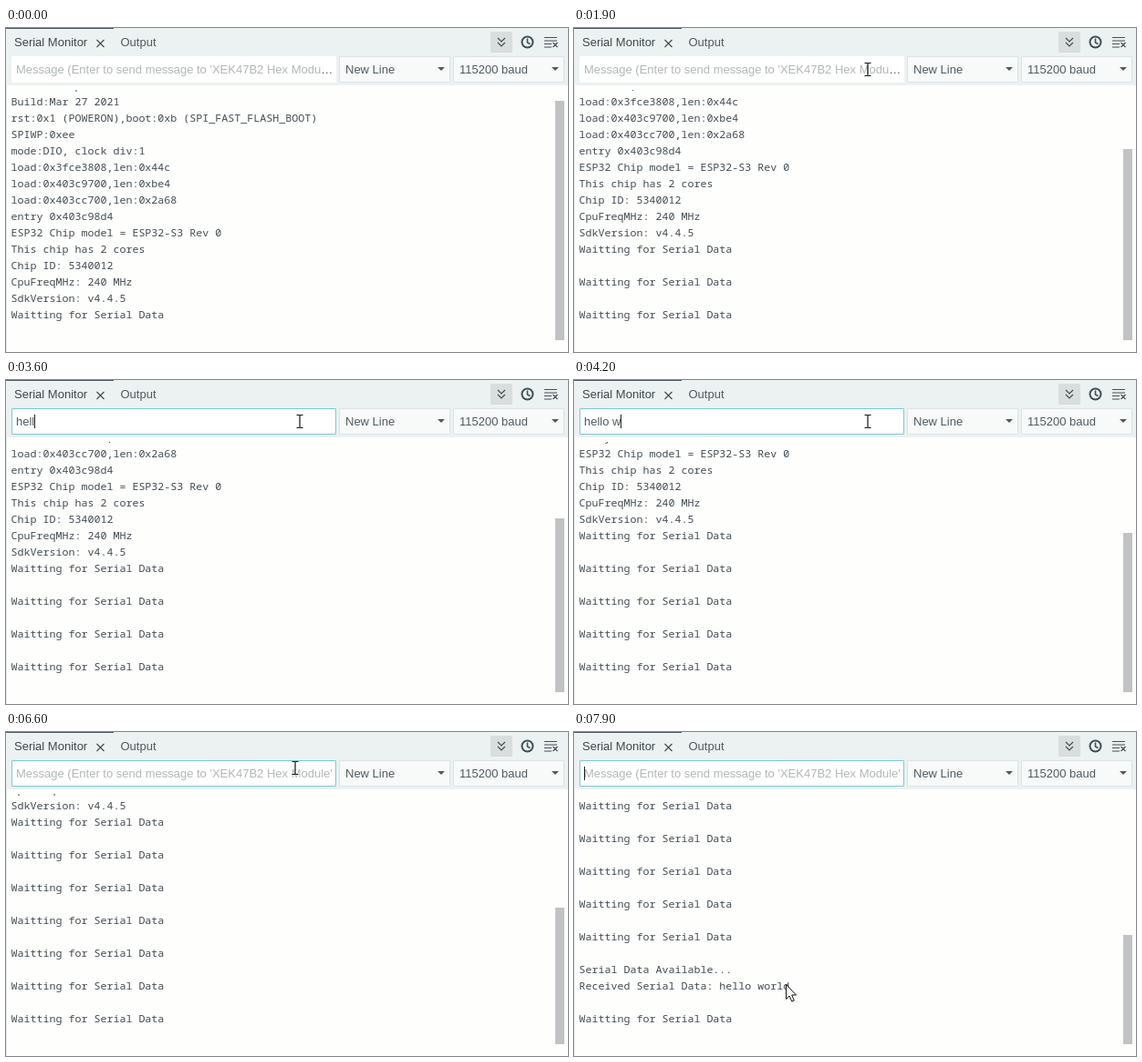
An HTML page that plays this animation: 616 px wide and 356 px high, repeating every 8000 ms.

```html
<!DOCTYPE html>
<html lang="en">
<head>
<meta charset="utf-8">
<title>Serial monitor</title>
<style>
@property --rows { syntax: "<integer>"; inherits: true; initial-value: 16; }

html, body { margin: 0; width: 100%; height: 100%; overflow: hidden; }
body {
  position: relative;
  background: #fefefd;
  color: #4e5b61;
  font: 13px/15px "Liberation Sans", Arial, sans-serif;
}
#stage { position: absolute; left: 0; top: 0; width: 616px; height: 356px; overflow: hidden; }
#stage > * { position: absolute; }
#stage::after {
  content: ""; position: absolute; left: 0; top: 63px; bottom: 0; width: 1px; background: #e3e8e8;
}
svg { left: 0; top: 0; overflow: visible; }
.line { fill: none; stroke: #424f56; }

.box {
  box-sizing: border-box; top: 31px; height: 29px;
  padding: 6px; border: 1px solid #dae3e3; border-radius: 1px;
  background: #f8fafa; white-space: pre;
}
.box.pick::after {
  content: ""; position: absolute; right: 5px; top: 11px;
  border: 4px solid transparent; border-top-color: #4e5b61; border-bottom: 0;
}
#field { left: 6px; width: 356px; padding: 6px 0 6px 4px; background: #fff; border-color: #fff; }
#field.focus { border-color: #7fc8d0; }
#entry { width: 348px; height: 15px; overflow: hidden; text-overflow: ellipsis; }
.focus #entry { text-overflow: clip; }
#hint { color: #b1b7b9; }
#caret {
  display: inline-block; width: 1px; height: 15px; margin-right: -1px;
  vertical-align: top; background: #222;
}

/* The log sticks to its last row, so the row count sets scroll and thumb. */
#log { left: 0; top: 0; width: 616px; height: 356px; animation: rows 8s step-end infinite; }
#view { position: absolute; left: 5.5px; top: 68px; width: 590px; height: 274px; overflow: hidden; }
#text {
  position: absolute; left: 0; top: calc(274px - 18px * var(--rows));
  margin: 0; font: 11.6667px/18px "Noto Sans Mono", "Liberation Mono", monospace;
  color: #414c52; white-space: pre;
}
#reply { animation: reply 8s step-end infinite; }
#thumb {
  position: absolute; left: 602px; bottom: 13px; width: 10px;
  height: calc(275px * 275 / (18 * var(--rows))); background: #c1c2c4;
}
@keyframes rows {
  0% { --rows: 16; }
  8.75% { --rows: 18; }
  21.25% { --rows: 20; }
  33.75% { --rows: 22; }
  46.25% { --rows: 24; }
  58.75% { --rows: 26; }
  71.25% { --rows: 28; }
  83.75% { --rows: 32; }
  96.25%, 100% { --rows: 35; }
}
@keyframes reply {
  0% { visibility: hidden; }
  96.25%, 100% { visibility: visible; }
}

#cursor { animation: move 8s step-end infinite; }
#hand { animation: hand 8s step-end infinite; }
#beam { animation: beam 8s step-end infinite; }
#arrow { animation: arrow 8s step-end infinite; }
@keyframes move {
  0% { transform: translate(-60px, -60px); }
  12.5% { transform: translate(474px, -17px); }
  13.75% { transform: translate(454px, -19px); }
  16.25% { transform: translate(408px, 6px); animation-timing-function: steps(6); }
  23.75% { transform: translate(322px, 45px); }
  82.5% { transform: translate(317px, 39px); }
  87.5% { transform: translate(317px, 39px); animation-timing-function: steps(5); }
  93.75% { transform: translate(234px, 281px); }
  96.25%, 100% { transform: translate(232px, 277px); }
}
@keyframes hand {
  0% { visibility: visible; }
  21.25%, 100% { visibility: hidden; }
}
@keyframes beam {
  0% { visibility: hidden; }
  21.25% { visibility: visible; }
  88.75%, 100% { visibility: hidden; }
}
@keyframes arrow {
  0% { visibility: hidden; }
  88.75%, 100% { visibility: visible; }
}
</style>
</head>
<body>
<div id="stage">
  <svg width="616" height="63">
    <rect width="616" height="63" fill="#ecf1f1"/>
    <rect width="118" height="1" fill="#4e5b61"/>
    <g fill="#4e5b61">
      <text x="9" y="20" fill="#3c484e">Serial Monitor</text>
      <text x="125.5" y="20">Output</text>
    </g>
    <path class="line" stroke-width="1.2" d="M99.5 13l8 8m0-8l-8 8"/>
    <rect x="531" y="4" width="24" height="23" fill="#d9dddd"/>
    <path class="line" stroke-width="1.2" d="M539 11l4 4 4-4m-8 5l4 4 4-4"/>
    <circle class="line" cx="571.5" cy="15.5" r="6" stroke-width="2"/>
    <path class="line" stroke-width="1.6" d="M571.5 11.5v4.5l3 1.5"/>
    <path class="line" stroke-width="1.2" d="M590 10.5h14m-14 3.5h14m-14 3.5h8m-8 3.5h8m1.5-5l5 5m0-5l-5 5"/>
  </svg>

  <div id="field" class="box"><div id="entry"><span id="typed"></span><i id="caret"></i><span id="hint">Message (Enter to send message to 'XEK47B2 Hex Module' on 'COM3')</span></div></div>
  <div class="box pick" style="left:365px;width:122px">New Line</div>
  <div class="box pick" style="left:490px;width:122px">115200 baud</div>

  <div id="log">
    <div id="view"><div id="text"><span id="boot">ESP-ROM:esp32s3-20210327
Build:Mar 27 2021
rst:0x1 (POWERON),boot:0xb (SPI_FAST_FLASH_BOOT)
SPIWP:0xee
mode:DIO, clock div:1
load:0x3fce3808,len:0x44c
load:0x403c9700,len:0xbe4
load:0x403cc700,len:0x2a68
entry 0x403c98d4
ESP32 Chip model = ESP32-S3 Rev 0
This chip has 2 cores
Chip ID: 5340012
CpuFreqMHz: 240 MHz
SdkVersion: v4.4.5
</span><span id="waits"></span>Serial Data Available...
<span id="reply">Received Serial Data: hello world

Waitting for Serial Data
</span></div></div>
    <div id="thumb"></div>
  </div>

  <svg width="1" height="1">
    <g id="cursor">
      <g id="hand" stroke="#111" stroke-width="1.2" stroke-linejoin="round">
        <path fill="#fff" d="M-2 14V2Q-2 0 0 0T2 2V9Q2.5 7.5 4 7.5T5.5 9Q6 8 7.2 8.2T8.3 10Q10 9.5 10 11.5V17Q10 20 8 24H-2Q-2.5 21-4.5 18L-7 14Q-6.5 11.5-4.5 12.5Z"/>
        <path fill="none" d="M2 9V13M5.3 9.5V13M8.3 10.5V13.5"/>
      </g>
      <path id="beam" fill="none" stroke="#111" stroke-width="1.2" d="M-3.5-6.5H-1L0-6 1-6.5H3.5M0-6V7M-3.5 7.5H-1L0 7 1 7.5H3.5"/>
      <path id="arrow" fill="#fff" stroke="#111" stroke-linejoin="round" d="M.5.5V16.5L4 13 6.8 19 9.3 18 6.7 12H11.5Z"/>
    </g>
  </svg>
</div>

<script>
const $ = id => document.getElementById(id);
const message = "hello world";
const keyTimes = [3000, 3100, 3400, 3600, 3800, 4000, 4200, 4700, 5200, 5400, 5600];
const focusAt = 2100, sendAt = 5900;
const caretOn = [[focusAt, 2700], [3000, 6100], [6700, 7100], [7700, 8000]];

$("waits").textContent = "Waitting for Serial Data\n\n".repeat(8);

let start;
function draw(now) {
  start ??= now;
  const t = (now - start) % 8000;
  const count = t < sendAt ? keyTimes.filter(k => k <= t).length : 0;
  $("field").classList.toggle("focus", t >= focusAt);
  $("typed").textContent = message.slice(0, count);
  $("hint").hidden = count > 0;
  $("caret").style.visibility = caretOn.some(([a, b]) => t >= a && t < b) ? "visible" : "hidden";
  requestAnimationFrame(draw);
}
requestAnimationFrame(draw);
</script>
</body>
</html>
```
